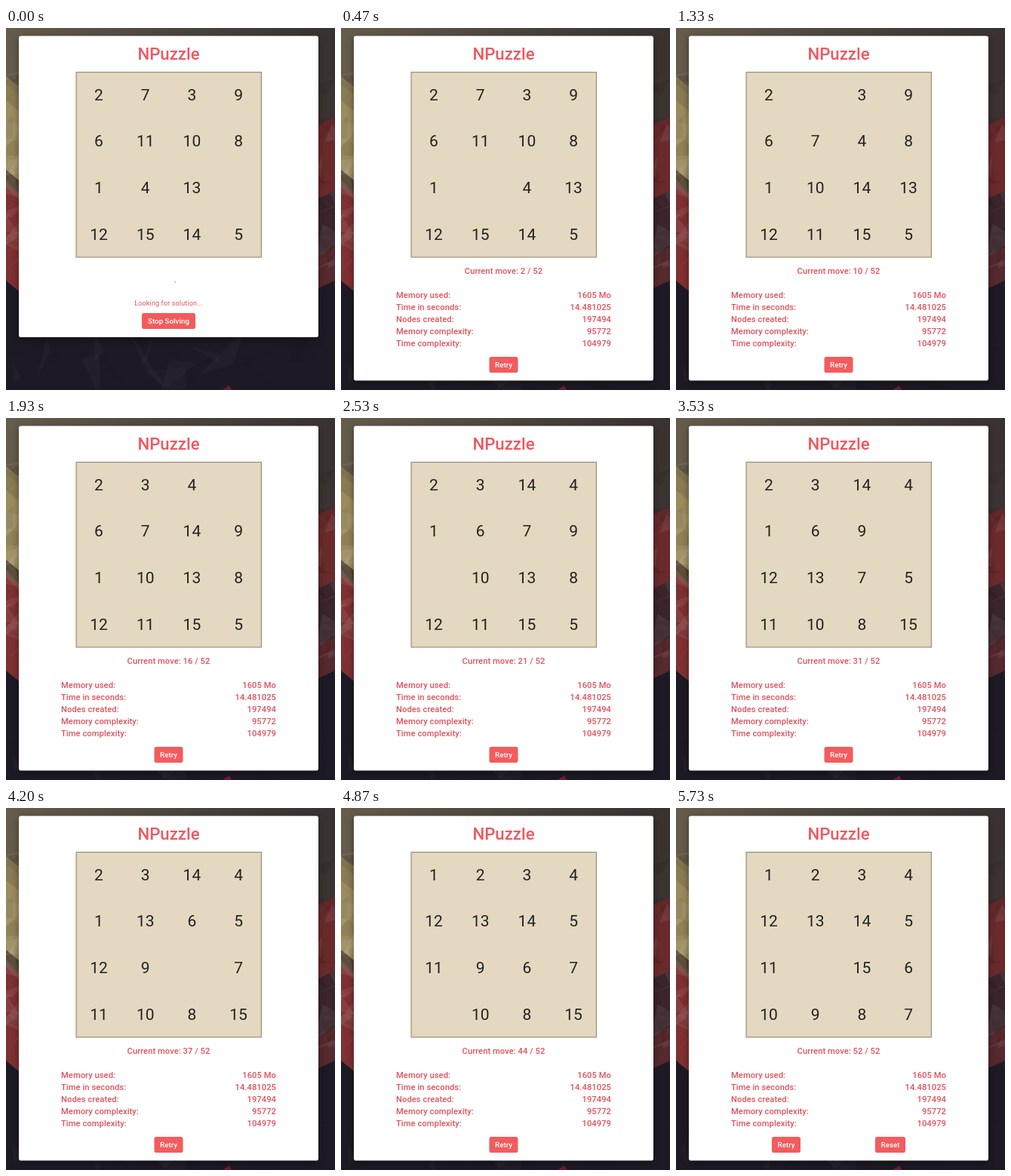
An HTML page with a canvas for the animation above (5.99 s loop, 436 px wide and 480 px high).

```html
<!DOCTYPE html>
<html lang="en">
<head>
<meta charset="utf-8">
<title>NPuzzle</title>
<style>
html, body { margin: 0; width: 100%; height: 100%; overflow: hidden; background: #1d1a24; }
canvas { display: block; width: 436px; height: 480px; }
</style>
</head>
<body>
<canvas id="stage"></canvas>
<script>
const W = 436, H = 480, LOOP = 5990;
const TICK = 200 / 3;
const FIRST_MOVE = 237, MOVE_STEP = 104.9;
const NIGHT = '#1e1a25', INK = '#e0525c', ACCENT = '#f35b5d';

// The solved board is a spiral; PATH is the way the empty cell travels to reach it.
const PATH = 'LLURDDLUUURDDRUULDLLDDRURRDLUURDLULDRUULLDDDRRRULDLU';
const STEP = { L: -1, R: 1, U: -4, D: 4 };
const BACK = { L: 'R', R: 'L', U: 'D', D: 'U' };

const STATS = {
  'Memory used:': '1605 Mo',
  'Time in seconds:': '14.481025',
  'Nodes created:': '197494',
  'Memory complexity:': '95772',
  'Time complexity:': '104979'
};

const canvas = document.getElementById('stage');
const ratio = window.devicePixelRatio || 1;
canvas.width = W * ratio;
canvas.height = H * ratio;
const ctx = canvas.getContext('2d');
ctx.scale(ratio, ratio);

function spiral() {
  const cells = Array(16).fill(0);
  let at = 0, dir = 0;
  for (let n = 1; n < 16; n++) {
    cells[at] = n;
    const ahead = () => at + STEP['RDLU'[dir]];
    const wall = [at % 4 === 3, at > 11, at % 4 === 0, at < 4][dir];
    if (wall || cells[ahead()]) dir = (dir + 1) % 4;
    at = ahead();
  }
  return cells;
}

function slide(cells, dir) {
  const gap = cells.indexOf(0), next = gap + STEP[dir], out = cells.slice();
  out[gap] = cells[next];
  out[next] = 0;
  return out;
}

const boards = [spiral()];
for (const dir of [...PATH].reverse()) boards.unshift(slide(boards[0], BACK[dir]));

function seeded(seed) {
  return () => (seed = (seed * 16807) % 2147483647) / 2147483647;
}

function shape(g, color, points) {
  g.fillStyle = color;
  g.beginPath();
  for (const [x, y] of points) g.lineTo(x, y);
  g.fill();
}

// Faint triangles, lighter or darker, scattered over a region.
function facets(g, rand, count, x, y, w, h, size, alpha) {
  for (let i = 0; i < count; i++) {
    const cx = x + rand() * w, cy = y + rand() * h;
    const near = () => [cx + (rand() - 0.5) * size, cy + (rand() - 0.5) * size];
    const tone = rand() < 0.5 ? 255 : 0;
    shape(g, `rgba(${tone},${tone},${tone},${alpha})`, [near(), near(), near()]);
  }
}

// Stacked colour bands, each running from its top edge down to the stage floor.
function ribbon(g, x, slant, bands) {
  for (const [top, color] of bands) {
    shape(g, color, [[x, top], [x + 22, top + slant], [x + 22, H], [x, H]]);
  }
}

function paintBackdrop() {
  const layer = document.createElement('canvas');
  layer.width = canvas.width;
  layer.height = canvas.height;
  const g = layer.getContext('2d');
  g.scale(ratio, ratio);
  const rand = seeded(41);
  const sky = g.createLinearGradient(0, 0, W, 0);
  sky.addColorStop(0, '#665c4b');
  sky.addColorStop(0.6, '#48423c');
  sky.addColorStop(1, '#383130');
  g.fillStyle = sky;
  g.fillRect(0, 0, W, H);
  ribbon(g, 0, 18, [[64, '#8a7b55'], [96, '#9b8b5d'], [188, '#54422f'], [207, '#7f3031'], [335, NIGHT]]);
  ribbon(g, 414, -10, [[70, '#3b3331'], [128, '#6a2a2c'], [226, '#39252b'], [300, '#55292d'], [345, NIGHT]]);
  facets(g, rand, 24, 0, 60, 18, 270, 50, 0.07);
  facets(g, rand, 24, 414, 60, 22, 270, 50, 0.07);
  g.fillStyle = NIGHT;
  g.fillRect(17, 380, 397, 100);
  facets(g, rand, 26, 0, 390, W, 90, 90, 0.025);
  shape(g, '#6b1f33', [[287, 480], [296, 474], [299, 480]]);
  return layer;
}

const backdrop = paintBackdrop();

function text(str, x, y, size, { color = INK, align = 'center', weight = 400, spacing = 0 } = {}) {
  ctx.font = `${weight} ${size}px Roboto, sans-serif`;
  ctx.letterSpacing = spacing + 'px';
  ctx.textAlign = align;
  ctx.fillStyle = color;
  ctx.fillText(str, x, y);
}

function box(x, y, w, h, color) {
  ctx.fillStyle = color;
  ctx.beginPath();
  ctx.roundRect(x, y, w, h, 2.8);
  ctx.fill();
}

function card(height) {
  ctx.save();
  ctx.shadowColor = 'rgba(0,0,0,0.4)';
  ctx.shadowBlur = 10 * ratio;
  ctx.shadowOffsetY = 3 * ratio;
  box(17, 10.5, 397, height, '#fff');
  ctx.restore();
}

function button(label, cx, y, w) {
  box(cx - w / 2, y, w, 21, ACCENT);
  text(label, cx, y + 14, 9.8, { color: '#fff', weight: 500 });
}

function drawBoard(cells) {
  ctx.fillStyle = '#e4d8c1';
  ctx.fillRect(92.5, 58, 246.5, 246.5);
  ctx.lineWidth = 1;
  for (let i = 0; i < 2; i++) {
    ctx.strokeStyle = `rgba(90,76,54,${0.52 / (1 + 4 * i)})`;
    ctx.strokeRect(93 + i, 58.5 + i, 245.5 - 2 * i, 245.5 - 2 * i);
  }
  cells.forEach((n, i) => {
    if (n) text(n, 123 + (i % 4) * 61.7, 95.6 + (i >> 2) * 61.8, 21, { color: '#222' });
  });
}

function ease(p) {
  return (1 - Math.cos(Math.PI * p)) / 2;
}

function drawSearch(t) {
  for (let i = 0; i < 3; i++) {
    const phase = (0.715 + t / 1400 + (2 - i) * 0.114) % 1;
    const size = ease(Math.max(0, 1 - Math.abs(phase - 0.4) / 0.4));
    if (size < 0.01) continue;
    ctx.fillStyle = INK;
    ctx.beginPath();
    ctx.arc(206 + i * 9, 337, 0.5 + size * 3, 0, 7);
    ctx.fill();
  }
  text('Looking for solution...', 215.5, 368, 9, { spacing: 0.15 });
  button('Stop Solving', 215.5, 378, 71);
}

function drawResult(move) {
  const last = PATH.length;
  const style = { weight: 500, spacing: 0.05 };
  text(`Current move: ${move} / ${last}`, 215.5, 326, 11.2, style);
  Object.entries(STATS).forEach(([label, value], i) => {
    const y = 358 + i * 16;
    text(label, 73, y, 11.2, { ...style, align: 'left' });
    text(value, 358, y, 11.2, { ...style, align: 'right' });
  });
  if (move < last) {
    button('Retry', 215.5, 436, 38);
  } else {
    button('Retry', 146, 436, 38);
    button('Reset', 284, 436, 40);
  }
}

function draw(t) {
  // Hold each picture for one tick, with ticks starting on whole hundredths.
  const now = Math.floor((Math.floor(t / 10) * 10 + 3.4) / TICK) * TICK;
  const move = Math.min(PATH.length, Math.floor((now - FIRST_MOVE) / MOVE_STEP));
  const solved = move >= 0;

  ctx.drawImage(backdrop, 0, 0, W, H);
  card(solved ? 457 : 399.5);
  text('NPuzzle', 215.5, 42, 22.2, { color: '#ee585f', weight: 500 });
  drawBoard(boards[Math.max(0, move)]);
  if (solved) drawResult(move);
  else drawSearch(now);
}

const began = performance.now();
function loop() {
  draw((performance.now() - began) % LOOP);
  requestAnimationFrame(loop);
}
loop();
</script>
</body>
</html>
```
